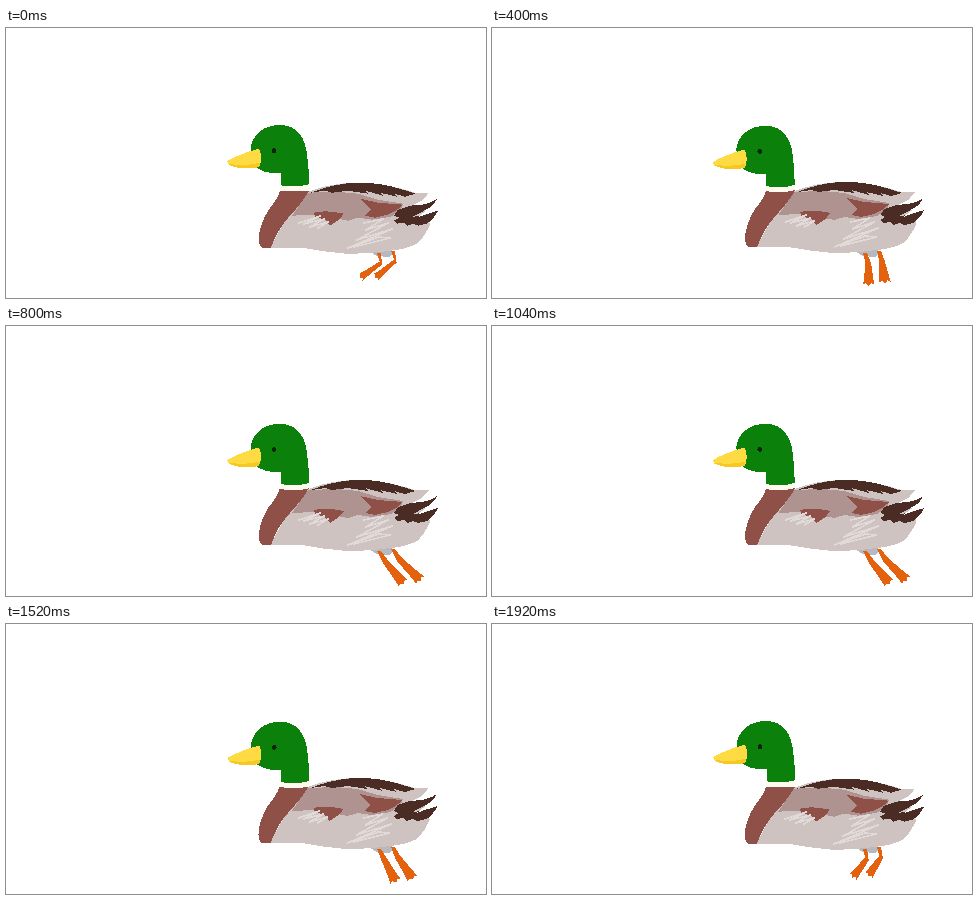
An HTML page that plays this animation: 480 by 270 pixels, repeating every 2000 ms.

```html
<!DOCTYPE html>
<html lang="en">
<head>
<meta charset="utf-8">
<title>Paddling duck</title>
<style>
  html, body { margin: 0; width: 100%; height: 100%; overflow: hidden; background: #fff; }
  svg { display: block; width: 100vw; height: 100vh; }
  .scribble { fill: none; stroke: #e2dad9; stroke-width: 1.6; stroke-linecap: round; stroke-linejoin: round; }
</style>
</head>
<body>
<svg viewBox="0 0 480 270" shape-rendering="crispEdges">
  <path fill="#b6b9c0" d="M361 222 L387 219 L386 226 L383 229 L371 228 Z"/>
  <g fill="#e4620e">
    <path id="farLeg"/>
    <path id="nearLeg"/>
  </g>
  <g id="torso">
    <path fill="#cfc3c2" d="M302 163 C318 157 334 154 352 154 C374 154 394 159 409 164 L423 164 L416 172 L404 178 L420 182 L424 196 Q418 209 411 215 Q399 221 384 222 Q364 225 340 225 Q317 223 296 219 L264 219 L280 190 Z"/>
    <path fill="#ae9390" d="M302 164 L330 163 L352 165 L372 171 L397 175 L395 181 L385 188 L366 191 L352 189 L342 192 L326 189 L308 186 L286 187 Z"/>
    <path fill="#8f5147" d="M274 162 L303 162 Q297 173 284 187 Q271 201 265 219 L256 219 Q252 216 253 206 Q255 194 262 182 Q272 170 274 162 Z"/>
    <path fill="#4a2c25" d="M305 164 Q324 156 347 154 Q373 153 397 161 L410 165 L399 168 L388 165 L391 168 L374 164 L377 167 L359 162 L362 165 L342 162 L326 164 L319 162 Z"/>
    <path fill="#8f5147" d="M308 184 Q319 181 338 185 L333 191 L324 197 L319 191 L309 188 Z"/>
    <path fill="#8f5147" d="M354 170 L372 174 L397 176 L390 182 L382 186 L369 189 L359 187 L365 181 Z"/>
    <path fill="#4a2c25" d="M388 187 L392 181 L404 177 L416 176 Q426 174 431 170 Q428 177 420 181 L407 188 L416 187 L432 182 Q428 190 421 195 L412 197 L407 195 L401 197 L398 194 L391 195 L388 192 L393 189 Z"/>
    <path fill="#fff" d="M432 173 L432 181 L411 189 L420 182 Z"/>
  </g>
  <g id="scribbles" class="scribble">
    <path d="M293 194 L314 187 L298 195 L318 190 L304 198 L322 193 L312 199"/>
    <path d="M358 194 L377 190 L360 201 L382 194 L351 211 L386 200 L342 219 L373 208 L384 209 L348 218"/>
  </g>
  <g id="head">
    <path fill="#fffaf0" d="M275 157 L303 156 L304 162 Q290 166 274 163 Z"/>
    <path fill="#0b800b" d="M244.500 122 C246 107 258 97.800 274 97.800 C291 98 299 110 301 127 Q303 142 303 157 Q289 161 274.500 158 L274.500 146 Q258 147 249 139 Z"/>
    <path fill="#ffdb43" d="M221 134 Q235 126 253 121.500 Q257 131 253 140 Q238 143 223 138 Z"/>
    <path fill="#f8c822" d="M222 136.500 Q239 139.500 254 135.500 L253 140 Q238 143 226 139 Z"/>
    <circle cx="268" cy="123.500" r="2.400" fill="#06260a"/>
  </g>
</svg>
<script>
const LOOP = 2000, STEP = 80, DELAY = 60;
const part = id => document.getElementById(id);
const mix = (a, b, t) => a + (b - a) * t;
const move = (id, x, y) => part(id).setAttribute("transform", `translate(${x.toFixed(2)} ${y.toFixed(2)})`);

// A leg tapers from the hip and widens past the ankle into a notched, webbed foot.
function legPath(hip, ankle, toe, spread) {
  const angle = Math.atan2(toe.y - ankle.y, toe.x - ankle.x);
  const dx = Math.cos(angle), dy = Math.sin(angle);
  const at = (p, along, side) =>
    `${(p.x + dx * along - dy * side).toFixed(1)} ${(p.y + dy * along + dx * side).toFixed(1)}`;
  const half = spread / 2;
  return "M" + [
    `${hip.x - 2} ${hip.y}`, at(ankle, 0, half), at(toe, -7, spread * .8), at(toe, 0, spread),
    at(toe, -1, half), at(toe, 2, 0), at(toe, -1, -half), at(toe, 1, -spread),
    at(toe, -7, -spread * .8), at(ankle, 0, -half), `${hip.x + 2} ${hip.y}`
  ].join(" L") + " Z";
}

// reach: 0 with the feet tucked forward, 1 with the feet stretched back.
function drawLegs(reach) {
  const tuck = (1 - reach) ** 3;
  const spread = mix(3.2, 5.6, Math.min(1, reach * 2.5));
  const near = legPath(
    { x: 373, y: 225 },
    { x: mix(372, 379, reach) + 3 * tuck, y: 235 },
    { x: mix(350, 397, reach), y: 257 - 11 * tuck },
    spread);
  const far = legPath(
    { x: 387, y: 223 },
    { x: mix(385, 393, reach) + 5 * tuck, y: 233 },
    { x: mix(365, 414, reach), y: 254 - 7 * tuck },
    spread);
  part("nearLeg").setAttribute("d", near);
  part("farLeg").setAttribute("d", far);
}

function draw(now) {
  const frame = Math.floor((now % LOOP) / STEP);
  const stroke = Math.abs(Math.sin(Math.PI * (frame * STEP - DELAY) / LOOP));
  drawLegs(Math.min(1, 1.12 * stroke));

  // The hand-drawn outline trembles in a four-step cycle.
  const sway = Math.sin(frame * Math.PI / 2);
  const lift = Math.max(0, Math.cos(frame * Math.PI / 2));
  move("head", -.3 * sway, -.8 * lift);
  move("torso", .3 * sway, .7 * lift);
  move("scribbles", .5 * sway, lift);
}

const start = performance.now();
function tick() {
  draw(performance.now() - start);
  requestAnimationFrame(tick);
}
tick();
</script>
</body>
</html>
```
